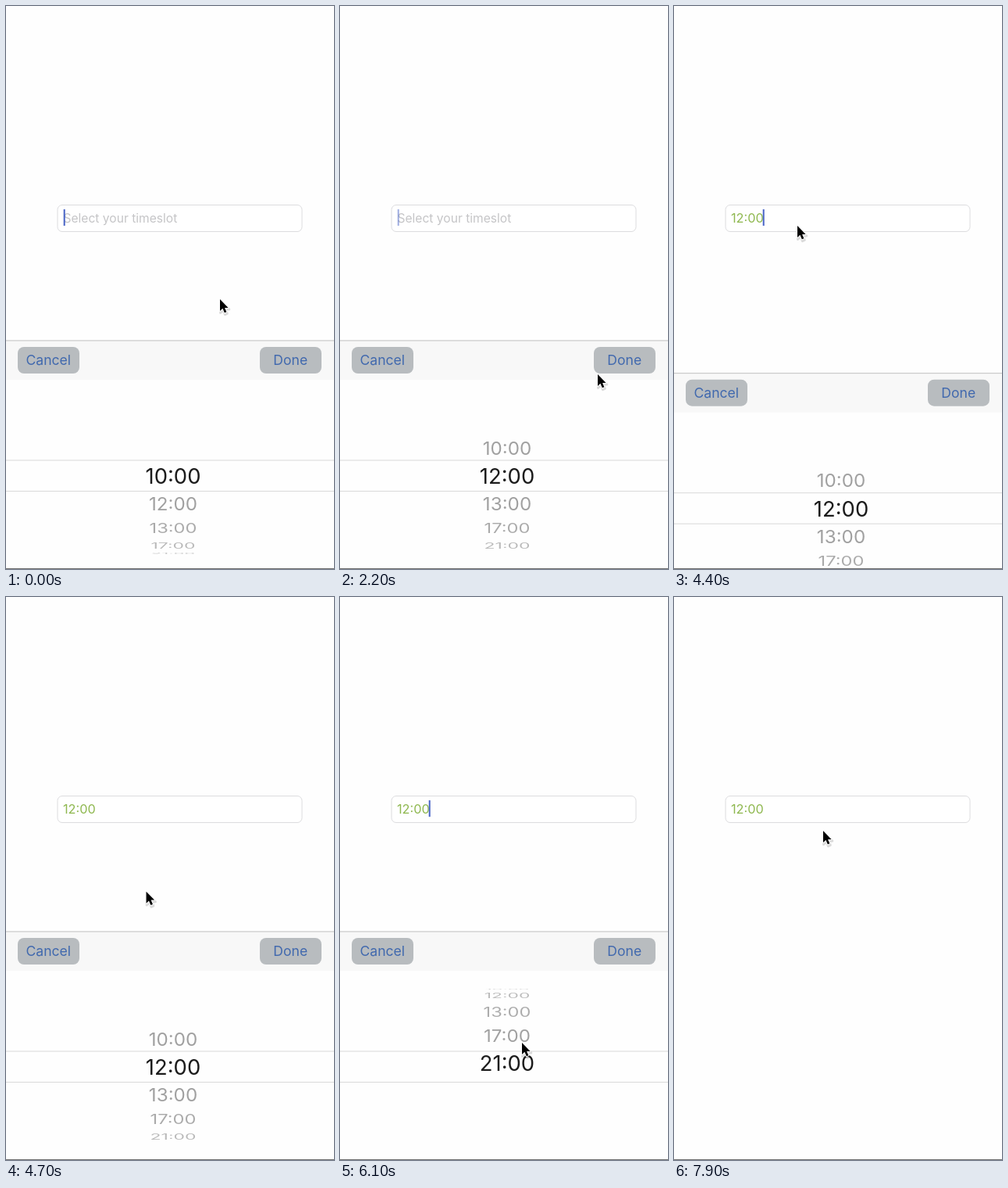
An HTML page that plays this animation: 420x720 px, repeating every 8000 ms.

```html
<!DOCTYPE html>
<html lang="en">
<head>
<meta charset="utf-8">
<title>Timeslot picker</title>
<style>
  html, body { margin: 0; width: 100%; height: 100%; overflow: hidden; background: #fefefe; }
  svg { display: block; width: 100%; height: 100%; font-family: Inter, Roboto, sans-serif; }
  .field { fill: #fff; stroke: #dcdcde; }
  .rule { fill: #d9d9d9; }
  .button rect { fill: #b8bcbf; }
  .button text { fill: #4169ae; font-size: 17.6px; text-anchor: middle; }
  .row { text-anchor: middle; font-size: 24.4px; }
  .selected .row { font-size: 27.4px; fill: #1c1c1c; }
</style>
</head>
<body>
<svg viewBox="0 0 420 720">
  <defs>
    <clipPath id="band"><rect y="582" width="420" height="38"/></clipPath>
  </defs>
  <rect width="420" height="720" fill="#fefefe"/>
  <rect class="field" x="66" y="254.5" width="313" height="34" rx="6"/>
  <text id="placeholder" x="73.5" y="276.8" font-size="15.6" fill="#c5c5c7">Select your timeslot</text>
  <text id="value" x="73" y="276.8" font-size="16.3" fill="#8fb850">12:00</text>
  <rect id="caret" y="260" width="2" height="21" fill="#4863c6"/>

  <g id="panel">
    <rect y="428" width="420" height="292" fill="#fefefe"/>
    <rect y="428" width="420" height="50" fill="#f8f8f8"/>
    <rect y="427.3" width="420" height="1.2" fill="#cacaca"/>
    <g class="button">
      <rect x="15" y="436" width="79" height="34" rx="8"/>
      <text x="54.3" y="459.2">Cancel</text>
    </g>
    <g class="button">
      <rect x="325" y="436" width="79" height="34" rx="8"/>
      <text x="364.3" y="459.2">Done</text>
    </g>
    <g id="wheel"></g>
    <rect y="581" width="420" height="39" fill="#fefefe"/>
    <rect class="rule" y="580.5" width="420" height="1"/>
    <rect class="rule" y="620" width="420" height="1"/>
    <g id="selected" class="selected" clip-path="url(#band)"></g>
  </g>

  <rect y="719" width="420" height="1" fill="#707070"/>
  <g id="pointer">
    <path d="M0 0V16L3.5 12.6L5.9 18.2L8.7 17L6.4 11.6H11.2Z" transform="translate(.6 1.4)" fill="none" stroke="#000" stroke-opacity=".14" stroke-width="3" stroke-linejoin="round"/>
    <path d="M0 0V15L3.4 11.8L5.8 17.3L8.4 16.2L6.1 10.9H10.6Z" fill="#000" stroke="#fff" stroke-width="2" stroke-linejoin="round" paint-order="stroke"/>
  </g>
</svg>

<script>
const LOOP = 8000;
const PANEL_HEIGHT = 294;
const ROW_ANGLE = 21 * Math.PI / 180;
const DRUM_RADIUS = 99.6;
const DRUM_X = 214;
const DRUM_Y = 601;
const SLOTS = ['10:00', '12:00', '13:00', '17:00', '21:00'];

// Each stop: time, then the values at that time.
const POINTER = [
  [100, 274, 375], [750, 233, 612], [1050, 233, 612], [1450, 233, 576],
  [1950, 233, 571], [2200, 330, 471], [2500, 362, 461], [3180, 362, 461],
  [3500, 205, 375], [4080, 162, 262], [4200, 159, 264], [4400, 158, 281],
  [5250, 233, 614], [5500, 233, 614], [5800, 233, 570], [6200, 233, 570],
  [7050, 38, 459], [7350, 38, 459], [7880, 191, 299]
];
const WHEEL = [
  [1050, 0], [1450, 0.94], [1750, 1], [5500, 1], [6000, 4.25], [6100, 4.138], [6350, 4]
];

const $ = id => document.getElementById(id);
const clamp = v => Math.min(1, Math.max(0, v));
const easeOut = p => 1 - (1 - p) ** 3;
const smooth = p => p * p * (3 - 2 * p);
const progress = (t, start, duration) => clamp((t - start) / duration);

function sample(stops, t) {
  const next = stops.findIndex(stop => stop[0] > t);
  if (next === 0) return stops[0].slice(1);
  if (next < 0) return stops[stops.length - 1].slice(1);
  const a = stops[next - 1], b = stops[next];
  const p = smooth((t - a[0]) / (b[0] - a[0]));
  return a.slice(1).map((v, i) => v + (b[i + 1] - v) * p);
}

function makeRows(parent) {
  return SLOTS.map(label => {
    const row = document.createElementNS('http://www.w3.org/2000/svg', 'text');
    row.setAttribute('class', 'row');
    row.setAttribute('dy', '.364em');
    row.textContent = label;
    return parent.appendChild(row);
  });
}
const wheelRows = makeRows($('wheel'));
const selectedRows = makeRows($('selected'));

function drawWheel(position) {
  SLOTS.forEach((_, i) => {
    const angle = (i - position) * ROW_ANGLE;
    const facing = Math.cos(angle);
    const y = DRUM_Y + DRUM_RADIUS * Math.sin(angle);
    const hidden = Math.abs(angle) >= Math.PI / 2;
    const scale = 0.89 + 0.11 * facing;
    wheelRows[i].setAttribute('transform', `translate(${DRUM_X} ${y}) scale(${scale} ${scale * facing})`);
    wheelRows[i].setAttribute('opacity', hidden ? 0 : 0.17 + 0.21 * facing);
    selectedRows[i].setAttribute('transform', `translate(${DRUM_X} ${y}) scale(1 ${facing})`);
    selectedRows[i].setAttribute('opacity', hidden ? 0 : 1);
  });
}

function panelOffset(t) {
  if (t < 3150) return 0;
  if (t < 4200) return PANEL_HEIGHT * easeOut(progress(t, 3150, 320));
  if (t < 7350) return PANEL_HEIGHT * (1 - easeOut(progress(t, 4200, 420)));
  return PANEL_HEIGHT * easeOut(progress(t, 7350, 320));
}

function caretOpacity(t) {
  const focused = t < 3150 || (t >= 4200 && t < 7350);
  if (!focused) return 0;
  const phase = ((t - (t < 3150 ? 630 : 0) + 1000) % 1000) / 1000;
  return phase < 0.8 ? 1 - progress(phase, 0.5, 0.15) : progress(phase, 0.88, 0.1);
}

function draw(t) {
  const chosen = t >= 3150;
  $('placeholder').setAttribute('opacity', chosen ? 0 : 1);
  $('value').setAttribute('opacity', chosen ? 1 : 0);
  $('caret').setAttribute('x', chosen ? 113.7 : 73.7);
  $('caret').setAttribute('opacity', caretOpacity(t));
  $('panel').setAttribute('transform', `translate(0 ${panelOffset(t)})`);
  $('pointer').setAttribute('transform', `translate(${sample(POINTER, t).join(' ')})`);
  drawWheel(sample(WHEEL, t)[0]);
}

const start = performance.now();
function tick() {
  draw((performance.now() - start) % LOOP);
  requestAnimationFrame(tick);
}
tick();
</script>
</body>
</html>
```
